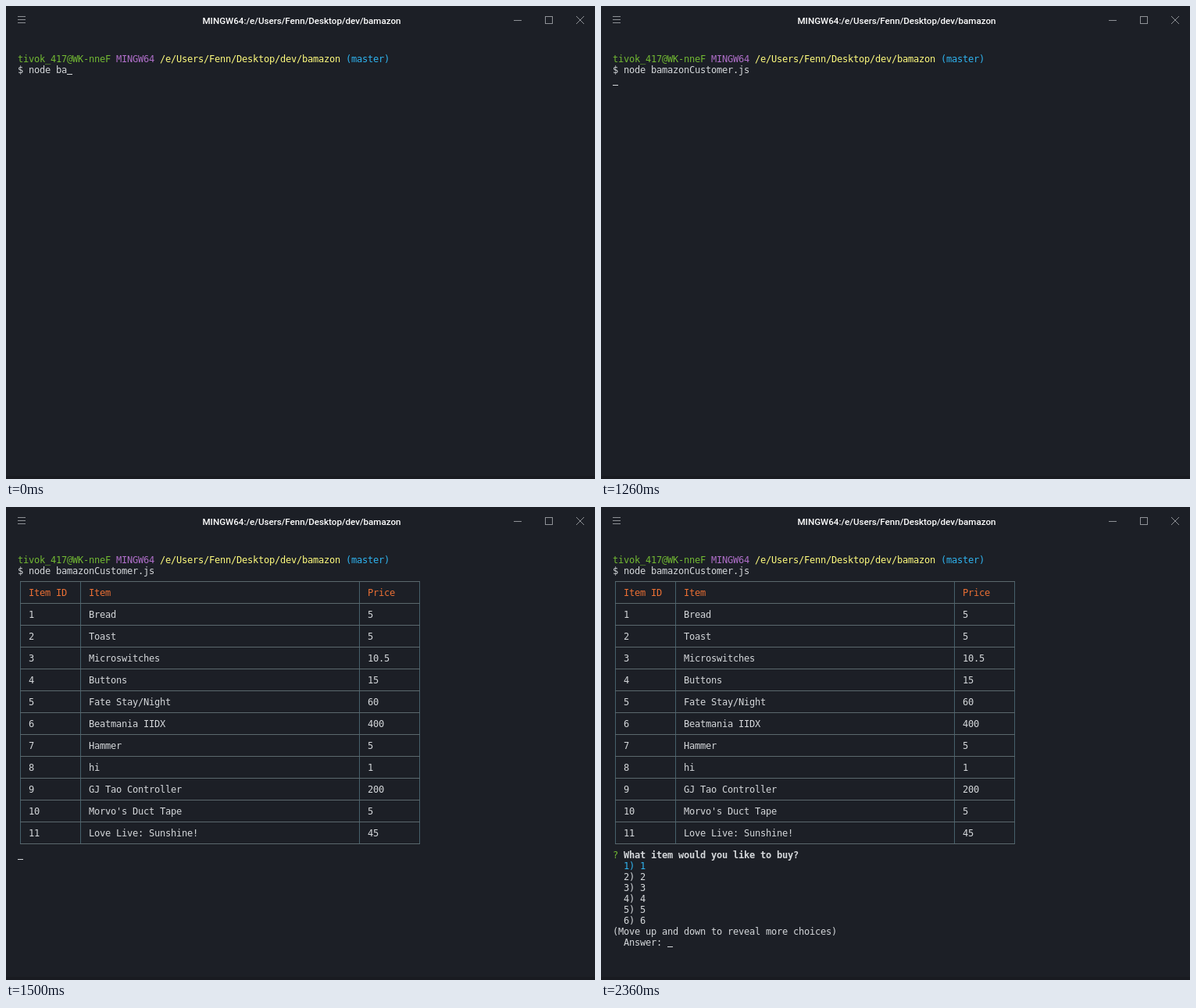
Animation of 754 by 606 pixels, one loop 2500 ms. Source, as an HTML page with a canvas:

```html
<!DOCTYPE html>
<html lang="en">
<head>
<meta charset="utf-8">
<title>Terminal</title>
<style>
html, body { margin: 0; width: 100%; height: 100%; overflow: hidden; background: #1c1f26; }
canvas { display: block; }
</style>
</head>
<body>
<canvas id="stage" width="754" height="606"></canvas>
<script>
const ctx = document.getElementById('stage').getContext('2d');
const LOOP = 2500, LEFT = 15, BASE = 72, CELL = 7, LINE = 14;
const MONO = '12px "DejaVu Sans Mono", monospace';
const C = {
  bg: '#1c1f26', text: '#d5d8db', green: '#72b933', purple: '#b06fca', yellow: '#fffc7e',
  blue: '#2fb4f0', orange: '#ec7034', icon: '#8f9297', rule: '#5b686d', bar: '#46606b'
};
const ITEMS = [
  ['Item ID', 'Item', 'Price'],
  ['1', 'Bread', '5'],
  ['2', 'Toast', '5'],
  ['3', 'Microswitches', '10.5'],
  ['4', 'Buttons', '15'],
  ['5', 'Fate Stay/Night', '60'],
  ['6', 'Beatmania IIDX', '400'],
  ['7', 'Hammer', '5'],
  ['8', 'hi', '1'],
  ['9', 'GJ Tao Controller', '200'],
  ['10', "Morvo's Duct Tape", '5'],
  ['11', 'Love Live: Sunshine!', '45']
];

function rect(x, y, w, h, color) {
  ctx.fillStyle = color;
  ctx.fillRect(x, y, w, h);
}

// Terminal text sits on a fixed character grid.
function put(col, row, str, color = C.text, bold = false) {
  ctx.font = (bold ? 'bold ' : '') + MONO;
  ctx.fillStyle = color;
  [...str].forEach((ch, i) => ctx.fillText(ch, LEFT + (col + i) * CELL, BASE + row * LINE));
}

function cursor(col, row) {
  rect(LEFT + col * CELL, BASE + row * LINE + 1, CELL, 1, C.text);
}

function titleBar() {
  ctx.font = '500 11.6px Roboto, sans-serif';
  ctx.fillStyle = '#fff';
  ctx.textAlign = 'center';
  ctx.fillText('MINGW64:/e/Users/Fenn/Desktop/dev/bamazon', 378.5, 23);
  ctx.textAlign = 'left';
  for (const y of [13, 17, 21]) rect(15, y, 10, 1, C.icon);
  rect(650, 18, 10, 1, C.icon);
  ctx.strokeStyle = C.icon;
  ctx.lineWidth = 1;
  ctx.strokeRect(690.5, 13.5, 9, 9);
  ctx.beginPath();
  ctx.moveTo(730, 13);
  ctx.lineTo(740, 23);
  ctx.moveTo(740, 13);
  ctx.lineTo(730, 23);
  ctx.stroke();
}

function shellPrompt() {
  put(0, 0, 'tivok_417@WK-nneF', C.green);
  put(18, 0, 'MINGW64', C.purple);
  put(26, 0, '/e/Users/Fenn/Desktop/dev/bamazon', C.yellow);
  put(60, 0, '(master)', C.blue);
}

function table() {
  for (const x of [18, 95, 452, 529]) rect(x, 95, 1, 337, C.bar);
  for (let i = 0; i <= ITEMS.length; i++) rect(18, 95 + i * 28, 512, 1, C.rule);
  ITEMS.forEach((cells, i) => cells.forEach((cell, j) =>
    put([2, 13, 64][j], 3 + i * 2, cell, i ? C.text : C.orange)));
}

function question() {
  put(0, 27, '?', C.green);
  put(2, 27, 'What item would you like to buy?', C.text, true);
  for (let n = 1; n <= 6; n++) put(2, 27 + n, `${n}) ${n}`, n === 1 ? C.blue : C.text);
  put(0, 34, '(Move up and down to reveal more choices)');
  put(2, 35, 'Answer:');
}

function draw(t) {
  rect(0, 0, 754, 606, C.bg);
  rect(0, 602, 754, 4, '#191b21');
  titleBar();
  shellPrompt();
  // Tab completion fills in the file name and a trailing space.
  const command = t < 220 ? '$ node ba' : '$ node bamazonCustomer.js ';
  put(0, 1, command);
  if (t >= 1380) table();
  if (t >= 1520) question();

  if (t < 860) cursor(command.length, 1);
  else if (t < 1380) cursor(0, 2);
  else if (t < 1520) cursor(0, 27);
  else cursor(10, 35);
}

const start = performance.now();
function tick() {
  draw((performance.now() - start) % LOOP);
  requestAnimationFrame(tick);
}
tick();
</script>
</body>
</html>
```
